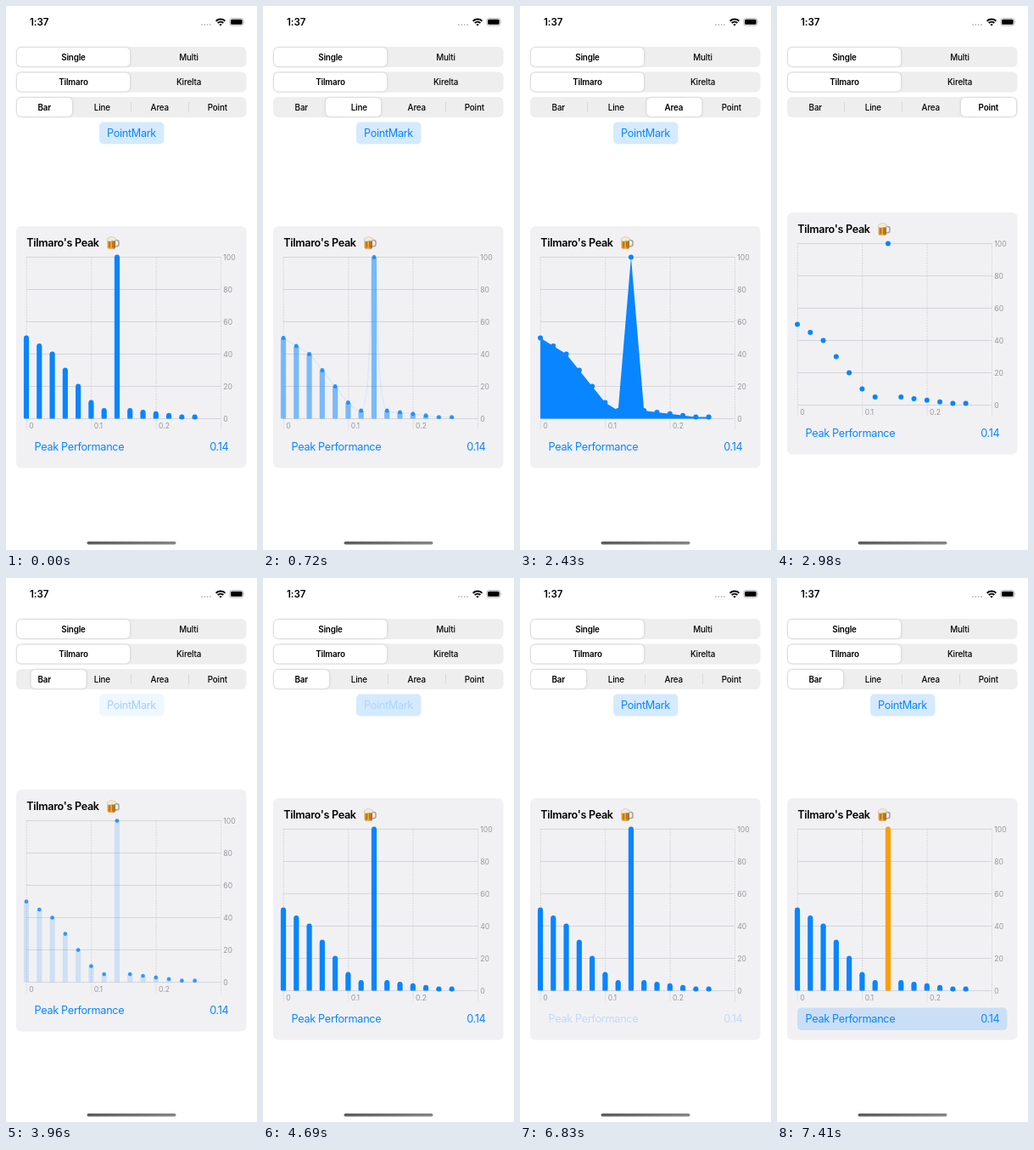
An HTML page that plays this animation: 296 px wide and 640 px high, repeating every 8 s.

```html
<!DOCTYPE html>
<html lang="en">
<head>
<meta charset="utf-8">
<title>Chart marks</title>
<style>
  html, body { margin: 0; width: 100%; height: 100%; overflow: hidden; background: #fff; }
  svg { display: block; width: 296px; height: 640px; font-family: Inter, Roboto, sans-serif; }
  .track { fill: #eeeeef; }
  .pill { fill: #fff; filter: drop-shadow(0 .8px 1.4px rgba(0, 0, 0, .2)); }
  .seg { font-size: 9.8px; font-weight: 500; letter-spacing: -.015em; text-anchor: middle; }
  .seg.on { font-weight: 600; }
  .link { font-size: 12.7px; letter-spacing: -.025em; fill: #0885ff; }
  .title { font-size: 12.6px; font-weight: 600; letter-spacing: -.025em; }
  .axis { font-size: 8.6px; fill: #97979b; }
  .grid { stroke: #cfcfd2; stroke-width: .8; }
  .dash { stroke: #d2d2d5; stroke-width: .8; stroke-dasharray: 2 1.2; }
  .tint { fill: #0885ff; fill-opacity: .17; }
</style>
</head>
<body>
<svg id="stage" viewBox="0 0 296 640">
  <defs>
    <linearGradient id="home"><stop stop-color="#5c5c5c"/><stop offset="1" stop-color="#858585"/></linearGradient>
    <linearGradient id="beer"><stop stop-color="#d98a1c"/><stop offset=".5" stop-color="#e8a93a"/><stop offset="1" stop-color="#a9601a"/></linearGradient>
  </defs>
  <text x="28" y="23" font-size="11.6" font-weight="600" letter-spacing="-.1">1:37</text>
  <g id="signal" fill="#b9b9bc"></g>
  <g fill="none" stroke="#000" stroke-width="1.9">
    <path d="M247.6 17.7a7.7 7.7 0 0 1 10.8 0M249.7 20a4.7 4.7 0 0 1 6.6 0"/>
    <path d="M253 23.6l-1.7-1.9a2.5 2.5 0 0 1 3.4 0z" fill="#000" stroke="none"/>
  </g>
  <rect x="263.8" y="14.6" width="16" height="8.4" rx="2.5" fill="none" stroke="#a5a5a7" stroke-width=".8"/>
  <rect x="265" y="15.8" width="13.6" height="6" rx="1.5"/>
  <path d="M280.7 17.3q1.3 1.5 0 3z" fill="#a5a5a7"/>
  <g id="tabs"></g>
  <g id="toggle">
    <rect id="toggleBg" class="tint" x="110" y="136.5" width="76.5" height="26" rx="5"/>
    <text id="toggleText" class="link" x="148" y="154.2" text-anchor="middle">PointMark</text>
  </g>
  <g id="card">
    <rect x="12" y="259" width="271.5" height="284.5" rx="6" fill="#f1f1f4"/>
    <text class="title" x="24.3" y="283.4">Tilmaro's Peak</text>
    <g id="mug">
      <path d="M128.5 275.5h2.2q2.3 0 2.3 2.4v2.4q0 2.5-2.4 2.5h-2" fill="none" stroke="#a9a39b" stroke-width="1.6"/>
      <path d="M119.7 274h9.3v10q0 1.8-1.8 1.8h-5.7q-1.8 0-1.8-1.8z" fill="url(#beer)"/>
      <path d="M122.4 277v7M126 277v7" stroke="#8b5015" stroke-width=".8"/>
      <path d="M119.2 276.5q-.9-3.6 2.1-4 3-2.2 5.200-.4 3.400-.2 2.900 3.400-2 1.800-4 .6-2.800 1.500-6.200.4z" fill="#f5ead2" stroke="#b9a78a" stroke-width=".4"/>
    </g>
    <g id="axes"></g>
    <g id="plot"></g>
    <rect id="peakBg" class="tint" x="24" y="505.500" width="247.500" height="26.500" rx="5"/>
    <g id="peakText" class="link">
      <text x="33.500" y="523.400">Peak Performance</text>
      <text x="262.500" y="523.400" text-anchor="end">0.14</text>
    </g>
  </g>
  <rect x="95.500" y="630" width="105" height="3.600" rx="1.800" fill="url(#home)"/>
</svg>
<script>
const LOOP = 8000, BAR = 0, LINE = 1, AREA = 2, POINT = 3, PEAK = 7;
const values = [50, 45, 40, 30, 20, 10, 5, 100, 5, 4, 3, 2, 1, 1];
const modes = ['Bar', 'Line', 'Area', 'Point'];
const pillX = [13, 82.7, 149.4, 217];

// Mode changes: finger down, chart fade start, target
const changes = [
  { press: 500, at: 610, to: LINE },
  { press: 1490, at: 1510, to: AREA },
  { press: 2480, at: 2650, to: POINT },
  { press: 3750, at: 3830, to: BAR }
];
// The screen refreshes in a few discrete steps: start, end, count
const bursts = [
  [500, 940, 5], [1490, 1820, 4], [2430, 2980, 6], [3750, 4170, 5], [4690, 4900, 2],
  [4900, 5230, 4], [5370, 5590, 2], [5590, 5930, 4], [6830, 7410, 6]
];

const $ = id => document.getElementById(id);
const clamp = v => Math.max(0, Math.min(1, v));
const smooth = v => v * v * (3 - 2 * v);
const ramp = (t, start, len) => smooth(clamp((t - start) / len));
const mix = (a, b, k) => a + (b - a) * k;

const base = 485.5;
const pts = values.map((v, i) => [24 + i * 15.28, base - v * 1.9]);

function add(parent, tag, attrs, text) {
  const el = document.createElementNS('http://www.w3.org/2000/svg', tag);
  for (const k in attrs) el.setAttribute(k, attrs[k]);
  if (text !== undefined) el.textContent = text;
  parent.append(el);
  return el;
}

// Centripetal Catmull-Rom through the data
function curve(p) {
  const gap = (a, b) => Math.sqrt(Math.hypot(b[0] - a[0], b[1] - a[1]));
  const handle = (prev, cur, next, sign) => {
    if (!prev || !next) return cur;
    const d0 = gap(prev, cur), d1 = gap(cur, next), len = sign > 0 ? d1 : d0;
    return cur.map((c, i) => c + sign * len / 3 *
      ((c - prev[i]) / d0 - (next[i] - prev[i]) / (d0 + d1) + (next[i] - c) / d1));
  };
  let d = 'M' + p[0];
  for (let i = 0; i < p.length - 1; i++) {
    d += `C${handle(p[i - 1], p[i], p[i + 1], 1)} ${handle(p[i], p[i + 1], p[i + 2], -1)} ${p[i + 1]}`;
  }
  return d;
}

for (let i = 0; i < 4; i++) add($('signal'), 'circle', { cx: 231 + i * 3.3, cy: 22, r: 0.9 });

// Segmented controls
const tabs = $('tabs');
const track = y => add(tabs, 'rect', { class: 'track', x: 12, y, width: 271.5, height: 24, rx: 6 });
const pillAt = (x, y, width) => add(tabs, 'rect', { class: 'pill', x, y: y + 1, width, height: 22, rx: 5 });
const label = (x, y, text, on) => add(tabs, 'text', { class: on ? 'seg on' : 'seg', x, y: y + 15.5 }, text);
[['Single', 'Multi', 48], ['Tilmaro', 'Kirelta', 77.5]].forEach(([a, b, y]) => {
  track(y);
  pillAt(13, y, 133);
  label(79.5, y, a, true);
  label(215.5, y, b);
});
track(107);
const seps = [79.5, 147.5, 215.5].map(x =>
  add(tabs, 'path', { d: `M${x} 113v12`, stroke: '#d3d3d6', 'stroke-width': 0.8 }));
const pill = pillAt(13, 107, 65);
const labels = modes.map((m, i) => label(45.3 + i * 68, 107, m));

// Chart
const axes = $('axes'), plot = $('plot');
for (let i = 0; i < 4; i++) {
  const x = 24.3 + i * 76.4;
  add(axes, 'path', { class: 'dash', d: `M${x} 295.5V498` });
  if (i < 3) add(axes, 'text', { class: 'axis', x: x + 3, y: 497 }, i ? '0.' + i : '0');
}
for (let v = 0; v <= 100; v += 20) {
  const y = base - v * 1.9;
  add(axes, 'path', { class: 'grid', d: `M24 ${y}H253` });
  add(axes, 'text', { class: 'axis', x: 256.3, y: y + 3.1 }, v);
}
const blue = '#0885ff';
const barLayer = add(plot, 'g', { fill: blue });
const bars = pts.map(([x, y]) =>
  add(barLayer, 'rect', { x: x - 3.1, y, width: 6.2, height: base - y, rx: Math.min(1, (base - y) / 2) }));
const lineLayer = add(plot, 'path', { d: curve(pts), fill: 'none', stroke: blue, 'stroke-width': 1.5 });
const areaLayer = add(plot, 'path', { d: `M24 ${base}L${pts.join(' ')}V${base}z`, fill: blue });
const dotLayer = add(plot, 'g', { fill: blue });
const dots = pts.map(([cx, cy]) => add(dotLayer, 'circle', { cx, cy, r: 3 }));
const layers = [barLayer, lineLayer, areaLayer];

function snap(t) {
  for (const [a, b, n] of bursts) {
    if (t >= a && t < b) {
      const step = (b - a) / (n - 1);
      return a + Math.floor((t - a) / step) * step;
    }
  }
  return t;
}

// Button text dims while held, then recovers
const held = (t, down, up) => t < down ? 1 : 0.2 + 0.8 * ramp(t, up, 300);

function draw(t) {
  let from = BAR, to = BAR, p = 1, slide = pillX[BAR], picked = BAR;
  const dim = [1, 1, 1, 1];
  for (const c of changes) {
    if (t >= c.press) dim[c.to] = 0.55 + 0.45 * clamp((t - c.at + 20) / 150);
    const s = clamp((t - c.at + 40) / 300);
    if (t >= c.at - 20) {
      slide = mix(pillX[picked], pillX[c.to], 1 - (1 - s) ** 3);
      picked = c.to;
    }
    if (t >= c.at) {
      from = to;
      to = c.to;
      p = ramp(t, c.at, 310);
    }
  }

  pill.setAttribute('x', slide);
  labels.forEach((el, i) => {
    el.setAttribute('class', i === picked ? 'seg on' : 'seg');
    el.style.opacity = dim[i];
  });
  seps.forEach((el, i) => el.style.opacity = picked === i || picked === i + 1 ? 0 : 1);

  layers.forEach((el, i) => {
    el.style.opacity = i === to ? p * p : i === from ? (1 - p) ** 2 : 0;
  });

  const lift = to === POINT ? p : from === POINT ? 1 - p : 0;
  $('card').setAttribute('transform', `translate(0 ${-16 * lift})`);
  $('toggle').style.opacity = 1 - lift;

  const off = ramp(t, 4850, 370) - ramp(t, 5540, 370);
  const dip = 4 * p * (1 - p);
  dotLayer.style.opacity = (1 - off) * (1 - 0.2 * dip);
  dots.forEach(el => el.setAttribute('r', 3 - 0.7 * dip - 1.6 * off));
  $('toggleBg').style.opacity = 1 - off;
  $('toggleText').style.opacity = t < 5370 ? held(t, 4690, 4850) : held(t, 5370, 5540);

  const peak = ramp(t, 7050, 340);
  const tone = [[8, 251], [133, 159], [255, 5]].map(([a, b]) => Math.round(mix(a, b, peak)));
  bars[PEAK].style.fill = dots[PEAK].style.fill = `rgb(${tone})`;
  $('peakBg').style.opacity = peak;
  $('peakText').style.opacity = held(t, 6830, 7050);
}

function frame() {
  draw(snap(performance.now() % LOOP));
  requestAnimationFrame(frame);
}
frame();
</script>
</body>
</html>
```
